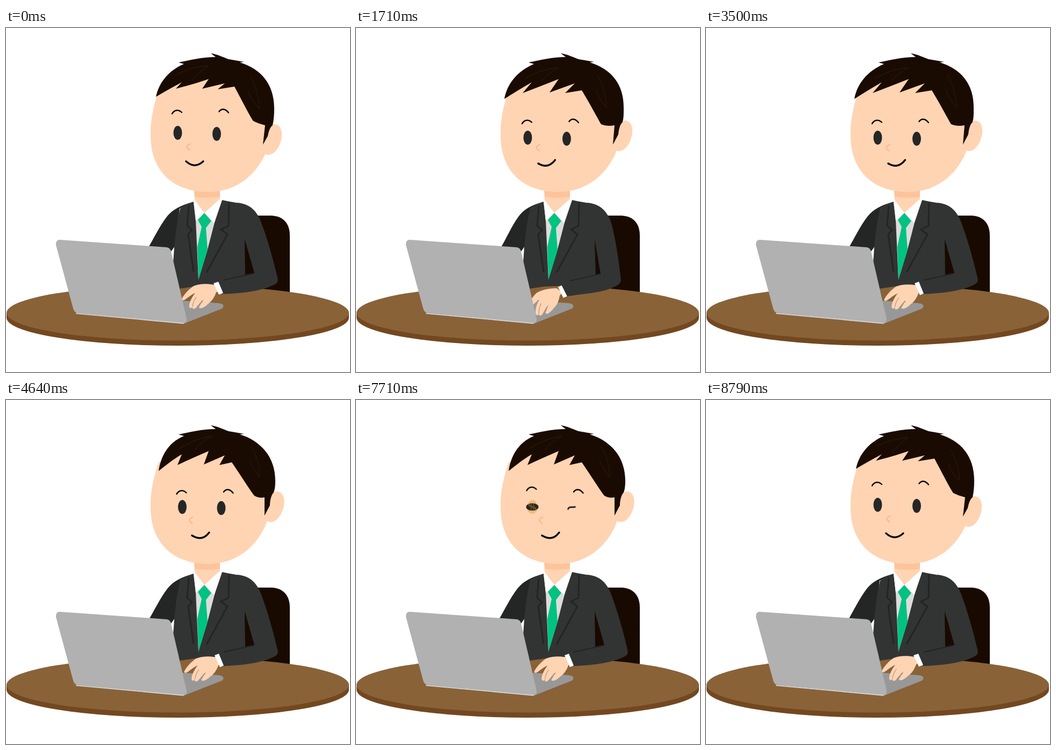
Write an HTML page that moves like this. It is 640 by 640 pixels and loops after 9.57 s.

```html
<!DOCTYPE html>
<html lang="en">
<head>
<meta charset="utf-8">
<title>Man at a laptop</title>
<style>
  html, body { margin: 0; width: 100%; height: 100%; overflow: hidden; background: #fff; }
  svg { display: block; width: 100vw; height: 100vh; }
  .line { fill: none; stroke-linecap: round; stroke-linejoin: round; }
</style>
</head>
<body>
<svg viewBox="0 0 640 640">
  <path fill="#180a01" d="M440 349H494C516 350 528 364 528 386V500H440Z"/>
  <path id="leftArm" fill="#232625"/>

  <g fill="#734820">
    <ellipse cx="319.5" cy="539" rx="318.5" ry="52"/>
    <rect x="1" y="530" width="637" height="9"/>
  </g>
  <ellipse cx="319.5" cy="530" rx="318.5" ry="51.5" fill="#896238"/>

  <path fill="#323433" d="M349 323C338 327 330 331 324 336C319 355 315 385 313 408L311 437L323 485L350 481L378 480L446 470V393L455 335C444 326 424 325 402 320Z"/>
  <path fill="#dcdcdc" d="M349 323L353 357L358 468L375 412L388 362L402 320Z"/>
  <path fill="#ffd4b3" d="M350 298H398V319L369 344L351 322Z"/>
  <path fill="#fdc49c" d="M350 298H398V314Q374 318 351 314Z"/>
  <path fill="#fff" d="M349 323L351 320L369 344L353 359ZM398 318L402 320L387 363L369 344Z"/>
  <path fill="#00c281" d="M369 344L382 359L372 372L375 413L358 468L356 407L364 370L357 357Z"/>
  <path class="line" stroke="#222524" stroke-width="3" style="stroke-linecap:butt;stroke-linejoin:miter" d="M340 331L337 368L346 376L339 384L349 454M415 325L414 368L400 375L412 384L373 455"/>

  <path fill="#989898" d="M322 507L396 512Q409 514 402 522L331 550Z"/>
  <g id="hand">
    <path fill="#ffd4b3" d="M388 478C375 475 358 476 349 480C340 486 331 496 327 504C327 508 331 507 335 504C341 499 347 495 352 493C346 500 340 512 341 519C343 523 346 521 347 518C346 523 349 524 353 521C358 515 362 509 367 506C365 510 360 517 359 520C362 524 370 519 375 514C384 508 388 500 391 492L396 488Z"/>
    <path class="line" stroke="#b8957a" stroke-width="1.2" d="M347 518Q348 509 354 501"/>
  </g>
  <path id="arm" fill="#323433"/>
  <path id="gap" fill="#180a01"/>
  <path id="crease" class="line" stroke="#222524" stroke-width="2"/>
  <path id="cuff" fill="#fff"/>

  <path fill="#b1b1b1" d="M100 394L299 408Q305 409 307 415L336 541Q337 549 330 549L133 530Q127 529 125 522L93 404Q92 394 100 394Z"/>
  <path class="line" stroke="#d2d2d2" stroke-width="2" d="M131 531L330 549.5"/>

  <path id="ear" fill="#ffd4b3" d="M500 179C510 180 514 190 513 202C511 220 500 236 488 236C480 236 472 230 478 212C482 195 490 180 500 179Z"/>
  <path fill="#ffd4b3" d="M284 116C274 145 268 175 269 200C269 267 312 305 376 305C428 305 464 274 482 235C486 226 490 214 490 196L484 120L400 70Z"/>
  <path id="hair" fill="#1a0b02"/>
  <path id="strands" class="line" stroke="#27160a" stroke-width="1.3"/>
  <path id="nose" class="line" stroke="#fbb98a" stroke-width="2.2" d="M343 215.5C334 219 335 223 342 227"/>
  <path id="mouth" class="line" stroke="#000" stroke-width="3.3"/>
  <g id="face"></g>
</svg>
<script>
const LOOP = 9570, STEP = 71.42;
const $ = id => document.getElementById(id);

const crown = "300 80 331 67L321 64C342 60 365 54 390 54L381 47C394 49 405 55 414 58L443 63L435 64";
const shoulder = "M430 325C453 327 465 339 473 357";

// Poses of the head: level, lowered, turned
const head = {
  hair: ["d",
    `M279 128C284 104 ${crown}C474 76 499 104 499 150C499 162 498 172 496 181C492 184 489 190 487 201L478 217L482 181C474 179 466 176 460 173C452 161 438 133 425 109L394 114L407 103L365 113L377 95C357 102 335 108 316 113L327 101C310 110 294 119 279 128Z`,
    `M276 132C281 104 ${crown}C474 76 499 104 498 150C498 160 498 168 496 175C491 180 489 188 488 198L478 217L481 181C472 183 463 182 456 179C448 165 433 137 420 116L389 121L407 103L360 120L377 95C355 104 333 112 310 121L327 101C309 111 292 122 276 132Z`,
    `M284 132C288 106 ${crown}C474 76 501 106 501 150C501 160 500 167 498 172C493 177 491 188 491 196L481 215L481 181C474 183 467 181 462 178C452 165 436 139 420 116L397 121L407 103L368 120L377 95C357 104 337 112 319 121L327 101C310 111 297 122 284 132Z`],
  strands: ["d",
    "M318 86Q345 72 376 70Q360 82 346 98M455 92Q470 118 472 150Q458 138 450 118",
    "M315 94Q342 77 376 74Q358 84 345 98M449 88Q464 112 466 148Q454 134 446 115",
    "M322 91Q350 72 384 67Q364 76 352 92M456 87Q471 110 472 143Q460 130 453 112"],
  ear: ["transform", "translate(0 0)", "translate(1 -7)", "translate(4.5 -9)"],
  nose: ["transform", "translate(0 0)", "translate(-1 1.5)", "translate(4.5 2.5)"],
  mouth: ["d", "M335 248Q351 263 367 248", "M339 252Q357 263 370.5 245.5", "M346 252Q365 264 378 246.5"],
  face: ["transform", "translate(0 0)", "translate(0 9)", "translate(8.5 4)"]
};
const browDrop = ["0 0", "0 9.5", "0 11.5"];

// Poses of the arms: resting, typing out, typing in, settled
const rest = `${shoulder}C484 385 496 425 505 464C507 471 505 474 500 477C475 490 435 494 403 495L394 472C415 468 440 462 462 456L444 393Z`;
const leftIn = "M347 324C325 330 312 337 301 350C287 368 275 393 266 408L300 426L314 406L325 335Z";
const arms = {
  arm: ["d", rest,
    `${shoulder}C481 380 488 425 493 466C494 473 490 477 484 480C460 493 425 494 393 499L382 479C405 470 430 463 455 457L444 393Z`,
    `${shoulder}C480 380 485 420 488 464C489 472 486 475 480 479C460 493 420 494 388 501L378 480C395 473 430 466 449 460L444 393Z`,
    rest],
  gap: ["d", "M444 393L462 456L445 460Z", "M444 393L455 457L446 459Z", "M444 393L449 459L445 460Z", "M444 393L462 456L445 460Z"],
  crease: ["d", "M405 469L461 456.5", "M400 470L455 457.5", "M393 473L449 459.5", "M405 469L461 456.5"],
  cuff: ["d", "M386 475L395 472L404 493L396 496Z", "M376 482L383 479L393 499L386 502Z", "M371 482L378 480L388 500L382 504Z", "M388 475L396 472L405 494L398 497Z"],
  hand: ["transform", "translate(0 0) rotate(0 395 484)", "translate(-13 5) rotate(-10 395 484)", "translate(-18 5) rotate(-10 395 484)", "translate(4.5 1) rotate(0 395 484)"],
  leftArm: ["d",
    "M347 324C325 330 311 337 300 350C286 368 274 393 265 408L300 426L314 406L323 336Z",
    "M347 324C325 330 313 337 303 350C290 368 279 393 270 408L300 426L314 406L325 335Z",
    leftIn, leftIn]
};

// [step, pose]
const headKeys = [[0, 0], [11, 1], [56, 1], [65, 2], [112, 2], [123, 0]];
const armKeys = [[16, 0], [23, 1], [30, 2], [37, 1], [44, 2], [49, 3], [112, 3], [123, 0]];

// [step, rx, ry, coin, brow lift]; ry 0 is a closed lid
const toCoin = [[67, 8, 13, 0, 0], [68, 8, 6, 0, 0], [69, 8, 0, 0, 0], [72, 8, 0, 0, 0], [73, 10, 8, .3, .33], [74, 13, 15, .7, .7], [75, 15, 20, 1, 1]];
const leftKeys = [...toCoin, [106, 15, 20, 1, 1], [107, 13.6, 16.2, .85, 1], [108, 11.5, 7, .4, 1], [109, 8, 8, 0, 1], [110, 8, 13, 0, 1], [112, 8, 13, 0, 1], [123, 8, 13, 0, 0]];
const rightKeys = [...toCoin, [89, 15, 20, 1, 1], [90, 13.6, 16.2, .85, .9], [91, 11.5, 7, .4, .4], [92, 8, 0, 0, 0], [100, 8, 0, 0, 0], [104, 8, 13, 0, 0], [106, 8, 13, 0, 0], [107, 8, 6, 0, 0], [108, 8, 0, 0, 0], [110, 8, 13, 0, 0]];

const lerp = (a, b, k) => a + (b - a) * k;
const smooth = k => k * k * (3 - 2 * k);
const NUM = /-?\d+(\.\d+)?/g;

function mix(a, b, k) {
  const to = b.match(NUM);
  let i = 0;
  return a.replace(NUM, n => +lerp(+n, +to[i++], k).toFixed(2));
}

function span(keys, n) {
  const i = keys.findIndex(key => key[0] > n);
  if (i === 0) return [keys[0], keys[0], 0];
  if (i < 0) return [keys.at(-1), keys.at(-1), 0];
  const a = keys[i - 1], b = keys[i];
  return [a, b, (n - a[0]) / (b[0] - a[0])];
}

function pose(parts, [a, b, k]) {
  for (const id in parts) {
    const [attr, ...poses] = parts[id];
    $(id).setAttribute(attr, mix(poses[a[1]], poses[b[1]], smooth(k)));
  }
}

function makeEye(x, y, brow) {
  const g = document.createElementNS("http://www.w3.org/2000/svg", "g");
  g.innerHTML = `
    <path class="line" stroke="#000" stroke-width="2.4" d="${brow}"/>
    <g transform="translate(${x} ${y})">
      <ellipse fill="#262626"/>
      <path class="line" stroke="#262626" stroke-width="2.8" d="M-6 2C-5 -2 -1 -2 1 -1.5L7 -2"/>
      <g class="line" stroke="#d08f1f">
        <path stroke-width="3.2" d="M6.5 -7C5 -11 -6.5 -11 -6.5 -5C-6.5 1 7 -1.5 7 5.5C7 11 -5.5 11 -7 6.5"/>
        <path stroke-width="1.7" d="M-2 -13V13M2.4 -13V13"/>
      </g>
    </g>`;
  $("face").append(g);
  const [browLine, group] = g.children;
  const [ball, lid, coin] = group.children;
  return { browLine, ball, lid, coin };
}

const left = makeEye(319.5, 195, "M309 159.5C313 152 321 151 327 157");
const right = makeEye(392, 197, "M396.5 155.5C400.5 149.5 408 149.5 414 157.5");

function drawEye(eye, keys, n, drop) {
  const [a, b, k] = span(keys, n);
  const [rx, ry, coin, lift] = [1, 2, 3, 4].map(i => lerp(a[i], b[i], k));
  eye.ball.setAttribute("rx", rx);
  eye.ball.setAttribute("ry", ry);
  eye.lid.setAttribute("opacity", ry < 1 ? 1 : 0);
  eye.coin.setAttribute("opacity", coin);
  eye.browLine.setAttribute("transform", `translate(0 ${drop - 6.5 * lift})`);
}

function draw(time) {
  const n = Math.floor((time % LOOP + 5) / STEP);
  const turn = span(headKeys, n);
  pose(head, turn);
  pose(arms, span(armKeys, n));
  const drop = +mix(browDrop[turn[0][1]], browDrop[turn[1][1]], smooth(turn[2])).split(" ")[1];
  drawEye(left, leftKeys, n, drop);
  drawEye(right, rightKeys, n, drop);
}

const start = performance.now();
function tick() {
  draw(performance.now() - start);
  requestAnimationFrame(tick);
}
tick();
</script>
</body>
</html>
```
